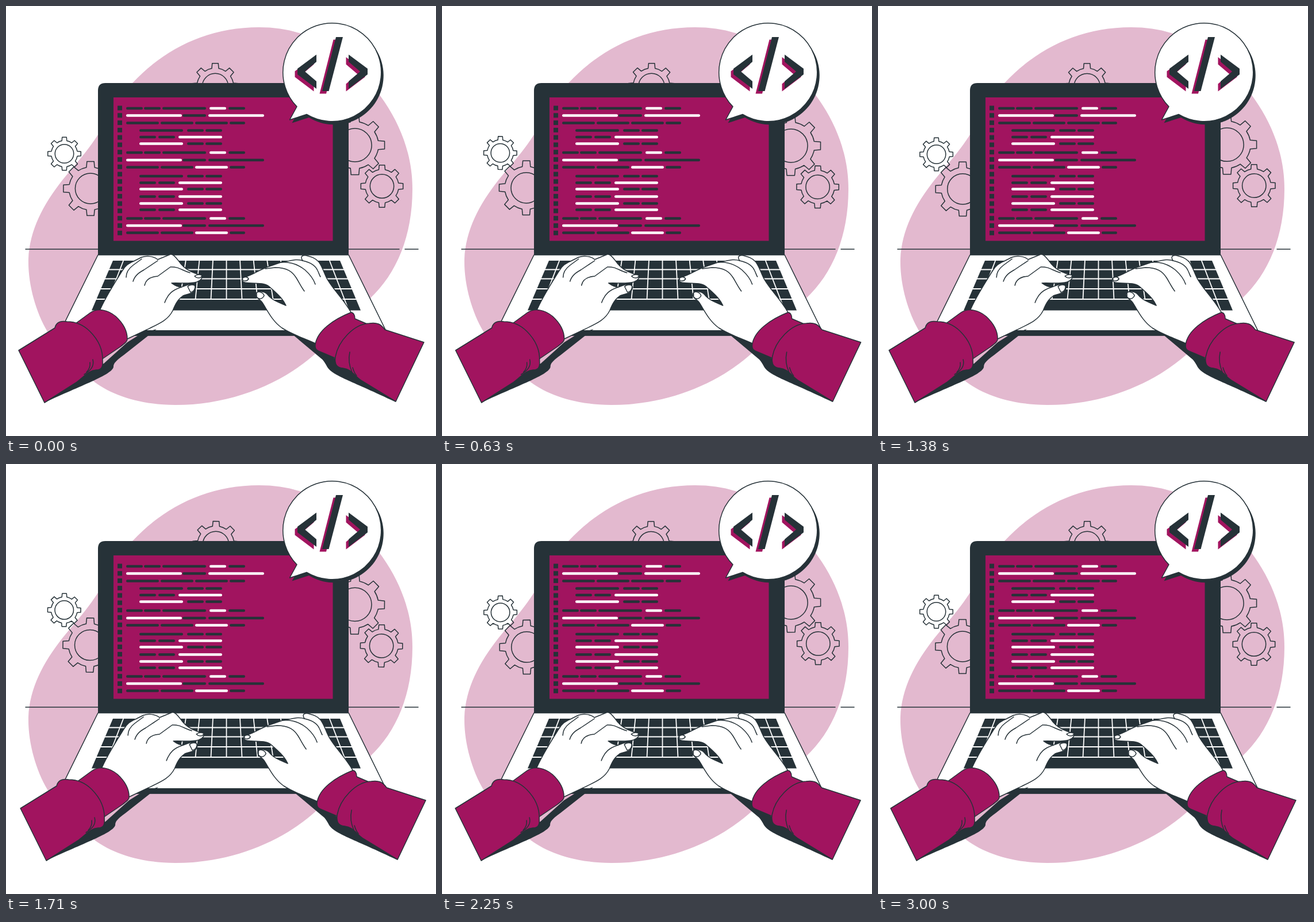
Animation, 748 px wide and 748 px high, one loop 3040 ms. Source, as an HTML page:

```html
<!DOCTYPE html>
<html lang="en">
<head>
<meta charset="utf-8">
<title>Typing code</title>
<style>
  html, body { margin: 0; width: 100%; height: 100%; overflow: hidden; background: #fff; }
  svg { display: block; width: 100vw; height: 100vh; }
  .ink { fill: #263238; }
  .wine { fill: #a1145f; }
  .paper { fill: #fff; }
  .line { fill: none; }
  .line, .edge { stroke: #263238; stroke-width: 1.5; stroke-linecap: round; stroke-linejoin: round; }
</style>
</head>
<body>
<svg viewBox="0 0 748 748">
  <path fill="#e3b9cf" d="M440 37C500 37 545 55 590 92C660 150 707 230 707 318C707 400 680 465 633 509C600 540 575 570 540 603C480 658 390 694 295 694C230 694 180 675 150 651C120 625 95 600 73 568C50 530 38 480 39 440C41 390 65 345 98 303C120 276 140 255 160 224C185 185 195 160 220 134C275 75 350 37 440 37Z"/>
  <path class="line" stroke-linecap="butt" d="M34 423H684M694 423H717"/>

  <g id="gears" class="line"></g>

  <!-- laptop -->
  <path class="ink" d="M160 433V147Q160 134 173 134H583Q596 134 596 147V433Z"/>
  <rect class="wine" x="187" y="159" width="381.500" height="249.500"/>
  <g id="code"></g>
  <path class="paper edge" d="M160 433H596L662 567L664 573H91Z"/>
  <path class="ink" d="M95 564H660L664 573.500H91Z"/>
  <path class="ink" d="M186 443H581L617 529.500H149Z"/>
  <path id="keys" fill="none" stroke="#fff" stroke-width="1.800"/>

  <!-- speech bubble -->
  <defs>
    <path id="bubble" d="M506 175A85.500 85.500 0 1 1 523 188.500L493.500 198Z"/>
    <path id="tag" d="M540 84.500L507 109V119L540 144V131L520 114L540 97ZM574 54H586L561.500 148H550ZM596 84.500L629 109V119L596 144V131L616 114L596 97Z"/>
  </defs>
  <use href="#bubble" class="ink" x="4" y="5.500"/>
  <use href="#bubble" class="paper edge"/>
  <use href="#tag" class="wine" x="-4.500" y="4.500"/>
  <use href="#tag" class="ink"/>

  <g id="hands">
    <!-- left arm -->
    <path class="ink" d="M262 562L205 607C190 618 187 622 187 628C184 642 130 660 67 690L130 640L170 622L211 585L235 570Z"/>
    <path class="paper edge" d="M163 530C172 508 190 480 202 461C208 451 213 448 222 444L236 437C245 434 257 435 264 441L286 432C291 431 296 438 300 443C306 452 312 457 320 461C328 465 336 467 340 469C343 473 338 478 332 480C318 484 302 481 288 482C292 485 298 489 305 489C312 487 316 484 322 484C330 484 331 490 328 495C324 502 315 500 308 504C298 511 294 520 290 530C282 546 268 552 245 563L205 582Z"/>
    <path class="line" d="M209 472C209 463 213 457 221 451L236 440M221 479C224 469 231 464 240 459L264 443M241 486C243 476 250 471 264 470L286 454C300 453 306 460 320 464M276 516C282 500 290 494 305 489"/>
    <path class="paper edge" d="M328 470C333 466 340 467 341 470C338 474 332 474 328 470ZM316 488C320 484 328 484 329 488C329 494 326 497 321 498Z"/>
    <path class="wine edge" d="M120 553L146 534C160 524 178 529 191 540C204 552 211 565 211 579C211 584 206 587 200 592L166 615Z"/>
    <path class="wine edge" d="M22 599L85 560C87 551 94 547 106 549C120 549 133 553 146 566C160 580 169 597 168 618C169 629 165 633 157 633C143 634 137 644 122 655L67 690Z"/>
    <path class="line" d="M151 615C154 627 147 634 136 641M146 620C147 628 144 633 140 637"/>

    <!-- right arm -->
    <path class="ink" d="M498 571L548 613C555 618 557 627 562 632C575 645 600 652 678 689L640 655L590 625L545 595L537 580Z"/>
    <path class="paper edge" d="M604 540C592 515 572 497 560 477C554 468 552 456 544 445C538 438 530 436 522 434C514 433 512 437 516 443C504 439 494 444 478 446L455 454C440 459 428 469 414 472C409 474 409 479 416 481C432 484 450 479 460 490C470 499 482 509 487 521C470 514 461 510 455 502C448 495 438 496 435 500C433 508 441 509 446 516C455 530 463 548 480 560C500 573 520 578 545 590Z"/>
    <path class="line" d="M516 443C530 446 538 451 542 460C545 466 545 468 547 471M478 446C497 444 510 451 520 459C530 468 535 475 538 484M451 457L468 455C489 455 498 462 505 473C510 481 513 488 519 496"/>
    <path class="paper edge" d="M411 474C415 470 421 471 422 475C419 479 412 480 411 474ZM436 499C440 495 448 499 449 504C446 510 440 511 436 506Z"/>
    <path class="wine edge" d="M600 533C570 545 541 565 538 589C537 598 542 600 548 602L574 613L628 553L607 544C607 537 604 533 600 533Z"/>
    <path class="wine edge" d="M727 585L659 563C652 553 645 550 632 552C605 553 578 583 573 610C571 624 576 629 586 630C602 632 605 643 619 652L678 688Z"/>
    <path class="line" d="M598 602C595 616 597 626 602 637M603 629C605 636 607 640 610 643"/>
  </g>
</svg>
<script>
  const NS = 'http://www.w3.org/2000/svg';
  const byId = id => document.getElementById(id);
  const add = (parent, tag, attrs) => {
    const el = document.createElementNS(NS, tag);
    for (const name in attrs) el.setAttribute(name, attrs[name]);
    parent.append(el);
  };

  // Gears: centre x, centre y, outer radius
  function gear(cx, cy, r) {
    const at = (angle, radius) =>
      `${(cx + radius * Math.sin(angle)).toFixed(2)} ${(cy - radius * Math.cos(angle)).toFixed(2)}`;
    const body = r * 0.79;
    let d = '';
    for (let i = 0; i < 8; i++) {
      const a = i * Math.PI / 4;
      d += (i ? `A${body} ${body} 0 0 1 ` : 'M') + at(a - 0.19, body);
      d += `L${at(a - 0.13, r)}L${at(a + 0.13, r)}L${at(a + 0.19, body)}`;
    }
    add(byId('gears'), 'path', { d: `${d}A${body} ${body} 0 0 1 ${at(-0.19, body)}Z` });
    add(byId('gears'), 'circle', { cx, cy, r: r * 0.56 });
  }
  [[101.5, 257, 29], [147, 317.5, 47.5], [364, 140, 40.5], [607, 242, 52], [654, 313.5, 37]]
    .forEach(g => gear(...g));

  // Code lines: stops of each dash, and one colour letter per dash
  const dashes = {
    A: [209, 238, 240, 269, 272, 348, 354, 383, 387, 416],
    B: [209, 306, 307, 348, 352, 449],
    C: [209, 266, 269, 326, 329, 386, 389, 416],
    D: [232, 308, 315, 344, 347, 376],
    E: [232, 261, 265, 294, 300, 376]
  };
  const rows = ('Adddwd Bwdw Cdddd Dddd Eddw Dwdd Adddwd Bwdd Cddwd Dddd Eddw Dwdd ' +
    'Eddw Dwdd Eddw Adddwd Bwdd Cddwd').split(' ');
  const rowY = [178, 190.5, 203.5, 216.5, 228, 239.5, 255, 268, 280.5, 296, 307.5, 318.5,
    331.5, 343.5, 354.5, 369.5, 382, 394.5];
  rows.forEach((row, i) => {
    const x = dashes[row[0]];
    add(byId('code'), 'rect', { class: 'ink', x: 194, y: 173.5 + i * 12.78, width: 8, height: 8 });
    [...row.slice(1)].forEach((c, k) => add(byId('code'), 'rect', {
      class: c === 'w' ? 'paper' : 'ink',
      x: x[2 * k], y: rowY[i] - 2.2, width: x[2 * k + 1] - x[2 * k], height: 4.4, rx: 2.2
    }));
  });

  // Keyboard grid, fanning out from the middle
  const keyX = (k, y) => 383.5 + k * 23.6 * (1 + 0.144 * (y - 443) / 67);
  let grid = '';
  for (const y of [458.5, 474.5, 492, 510]) grid += `M${keyX(-8.5, y)} ${y}H${keyX(8.5, y)}`;
  for (const k of [-7.6, -6.7, -5.8, -5, -4, -3, -2, -1, 0, 1, 2, 3, 4, 5, 5.8, 6.7, 7.6]) {
    const end = Math.abs(k) > 4 ? 530 : 510;
    grid += `M${keyX(k, 443)} 443L${keyX(k, end)} ${end}`;
  }
  byId('keys').setAttribute('d', grid);

  // Motion: [time, value] steps with straight runs between them
  const LOOP = 3040, STEP = 1000 / 24;
  const pace = [[0, 0], [630, 650], [1080, 1150], [1710, 1730], [2250, 2338], [2580, 2640], [2710, 2775], [3000, 3000]];
  const shake = [0, -1, 2, -4, 4, -4, 4, -4, 2, -1, 0].map((v, i) => [i * 300, v * 1.496]);
  const sway = [[0, 0], [375, 1], [1125, -1], [1500, 0]];

  function follow(steps, t) {
    let i = 1;
    while (i < steps.length - 1 && t > steps[i][0]) i++;
    const [t0, a] = steps[i - 1], [t1, b] = steps[i];
    return a + (b - a) * Math.min(1, (t - t0) / (t1 - t0));
  }

  const start = performance.now();
  function draw(now) {
    const t = Math.max(0, now - start) % LOOP;
    const tick = Math.min(72, Math.floor((t + 5) / STEP));
    const time = follow(pace, tick * STEP);
    byId('hands').setAttribute('transform', `translate(${follow(shake, time)} 0)`);
    byId('gears').setAttribute('transform', `rotate(${follow(sway, time % 1500)} 382 232)`);
    requestAnimationFrame(draw);
  }
  draw(start);
</script>
</body>
</html>
```
